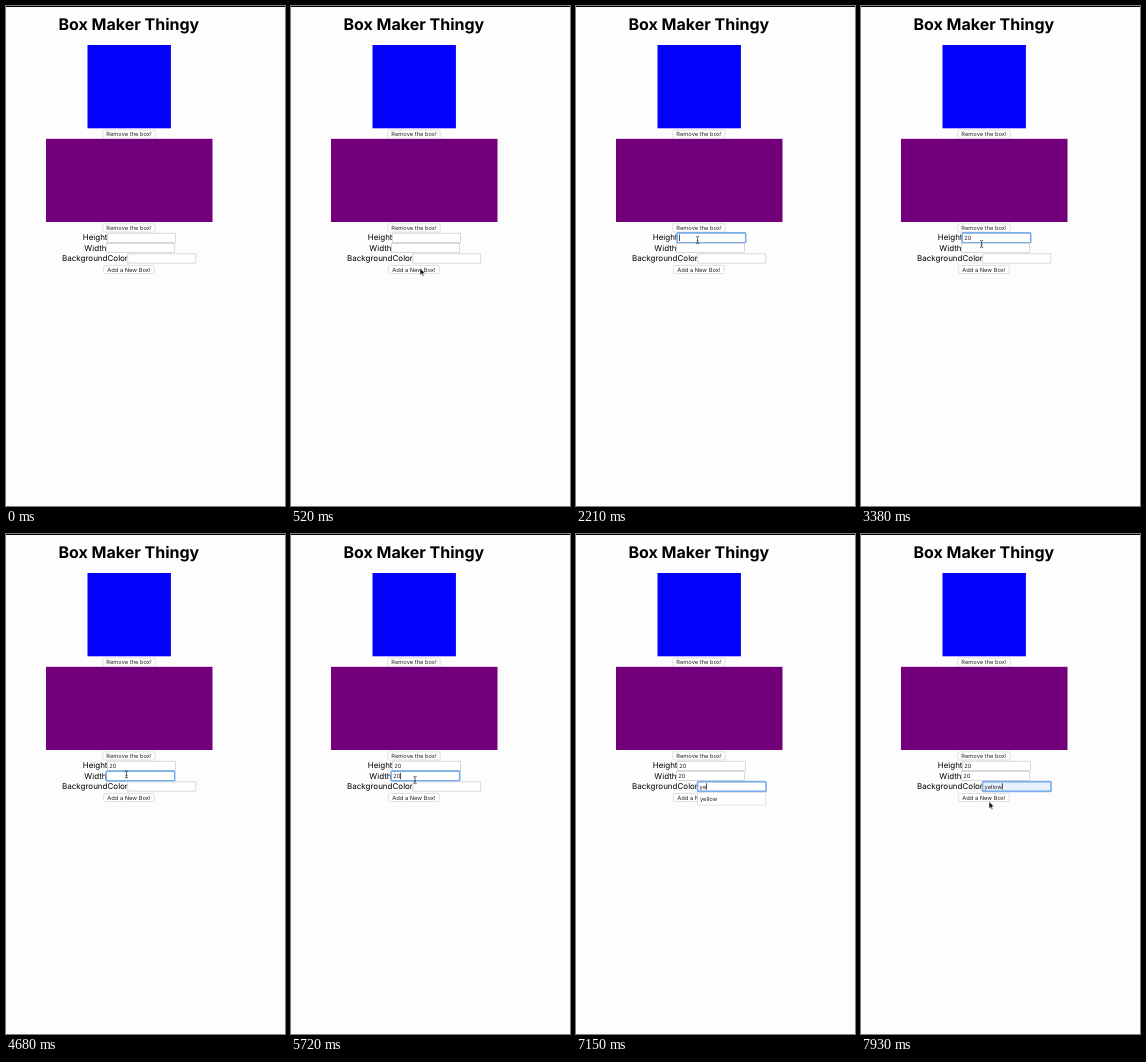
Animation, 279 px wide and 500 px high, one loop 8 s. Source, as an HTML page:

```html
<!DOCTYPE html>
<html lang="en">
<head>
<meta charset="utf-8">
<title>Box Maker Thingy</title>
<style>
  html, body { margin: 0; width: 100%; height: 100%; overflow: hidden; background: #fdfdfd; }
  svg { display: block; width: 279px; height: 500px; }
  text { font-family: Inter, "Open Sans", sans-serif; fill: #000; text-rendering: geometricPrecision; white-space: pre; }
  .title { font-size: 16px; font-weight: 700; text-anchor: middle; }
  .label { font-size: 8px; text-anchor: end; }
  .small { font-size: 5.75px; fill: #222; }
  .mid { text-anchor: middle; }
  .button { fill: #fff; stroke: #cbcbcb; stroke-width: .6; }
  .field { fill: #fff; stroke: #d0d0d0; stroke-width: .8; }
  .filled { fill: #e8f0fe; }
  .ring { fill: none; stroke: #79aeea; stroke-width: 1.6; }
  .menu { fill: #fff; stroke: #d4d4d4; stroke-width: .6; }
  .hover { fill: #ececec; }
</style>
</head>
<body>
<svg id="stage" viewBox="0 0 279 500">
  <rect width="279" height="500" fill="#fdfdfd"/>
  <rect width="279" height="1" fill="#000"/>
  <text class="title" x="122.8" y="24">Box Maker Thingy</text>
  <rect x="81.5" y="39" width="83.4" height="83.3" fill="#0300fb"/>
  <rect x="40" y="132.8" width="166.5" height="83.2" fill="#73007a"/>
  <g id="form"></g>
  <g id="menu">
    <rect id="row" class="menu" x="121.8" y="258.3" width="68" height="12.7"/>
    <text class="small" x="124" y="266.6">yellow</text>
  </g>
  <path id="beam" fill="none" stroke="#333" stroke-width=".75"
    d="M-1.6 -3.5Q0 -3.5 0 -2.6Q0 -3.5 1.6 -3.5M0 -2.6V2.6M-1.6 3.5Q0 3.5 0 2.6Q0 3.5 1.6 3.5M-1 1H1"/>
  <path id="arrow" fill="#111" stroke="#fff" stroke-width=".6"
    d="M0 0V7.2L1.7 5.7L2.8 8.3L4 7.8L2.9 5.2H5.2Z"/>
</svg>
<script>
const LOOP = 8000;
const $ = id => document.getElementById(id);

function add(tag, attrs, text = "") {
  const el = document.createElementNS("http://www.w3.org/2000/svg", tag);
  for (const key in attrs) el.setAttribute(key, attrs[key]);
  el.textContent = text;
  return $("form").appendChild(el);
}

function addButton(label, x, y, width) {
  add("rect", { class: "button", x, y, width, height: 8.2, rx: 1.4 });
  add("text", { class: "small mid", x: x + width / 2, y: y + 6.1 }, label);
}

function addField(label, x, y) {
  add("text", { class: "label", x: x + .1, y: y + 7.1 }, label);
  return {
    box: add("rect", { class: "field", x, y, width: 68, height: 9.2 }),
    ring: add("rect", { class: "ring", x: x - .3, y: y - .3, width: 68.6, height: 9.8, rx: 1 }),
    value: add("text", { class: "small", x: x + 1.8, y: y + 6.9 }),
    caret: add("rect", { x: 0, y: y + 1.4, width: .7, height: 6.4 }),
    x
  };
}

addButton("Remove the box!", 96.8, 124, 52.4);
addButton("Remove the box!", 96.8, 217.8, 52.4);
const fields = {
  height: addField("Height", 101.4, 227.2),
  width: addField("Width", 100.4, 237.4),
  color: addField("BackgroundColor", 121.8, 247.9)
};
addButton("Add a New Box!", 97.6, 259.4, 50.6);

// Each entry overrides part of the running state from its time on.
const start = { focus: "", caret: 0, height: "", width: "", color: "", pointer: "", at: [0, 0], menu: 0, hover: 0 };
const events = [
  [130, { pointer: "arrow", at: [148, 335] }],
  [260, { at: [144, 314] }],
  [390, { at: [137, 286] }],
  [520, { at: [129, 262] }],
  [650, { pointer: "beam", at: [123, 241] }],
  [780, { at: [121.6, 234] }],
  [1170, { focus: "height", caret: 1 }],
  [1690, { caret: 0 }],
  [2210, { caret: 1 }],
  [2600, { height: "2", pointer: "" }],
  [2860, { height: "20" }],
  [2990, { pointer: "beam", at: [121.4, 235] }],
  [3120, { at: [121, 236.5] }],
  [3250, { at: [120.6, 238] }],
  [3380, { caret: 0 }],
  [3900, { caret: 1, at: [120.5, 240.4] }],
  [4160, { focus: "width" }],
  [4680, { caret: 0 }],
  [5070, { width: "2", caret: 1, pointer: "" }],
  [5330, { width: "20" }],
  [5720, { pointer: "beam", at: [124, 246] }],
  [5850, { at: [130, 252] }],
  [5980, { focus: "color", at: [131, 253] }],
  [6500, { caret: 0 }],
  [7020, { color: "y", caret: 1, menu: 1, pointer: "" }],
  [7150, { color: "ye" }],
  [7540, { pointer: "arrow", at: [129, 275] }],
  [7670, { at: [128.5, 271] }],
  [7800, { color: "yellow", hover: 1, at: [128, 267.5] }],
  [7930, { menu: 0 }]
];

const show = (el, on) => el.setAttribute("visibility", on ? "visible" : "hidden");

function draw(time) {
  const state = Object.assign({}, start, ...events.filter(e => e[0] <= time).map(e => e[1]));
  for (const name in fields) {
    const f = fields[name], active = state.focus === name;
    f.value.textContent = state[name];
    f.caret.setAttribute("x", f.x + 1.8 + f.value.getComputedTextLength());
    show(f.ring, active);
    show(f.caret, active && state.caret);
  }
  fields.color.box.classList.toggle("filled", state.color === "yellow");
  $("row").classList.toggle("hover", !!state.hover);
  show($("menu"), state.menu);
  for (const kind of ["beam", "arrow"]) {
    $(kind).setAttribute("transform", `translate(${state.at})`);
    show($(kind), state.pointer === kind);
  }
}

const origin = performance.now();
function tick() {
  draw((performance.now() - origin) % LOOP);
  requestAnimationFrame(tick);
}
draw(0);
requestAnimationFrame(tick);
</script>
</body>
</html>
```
